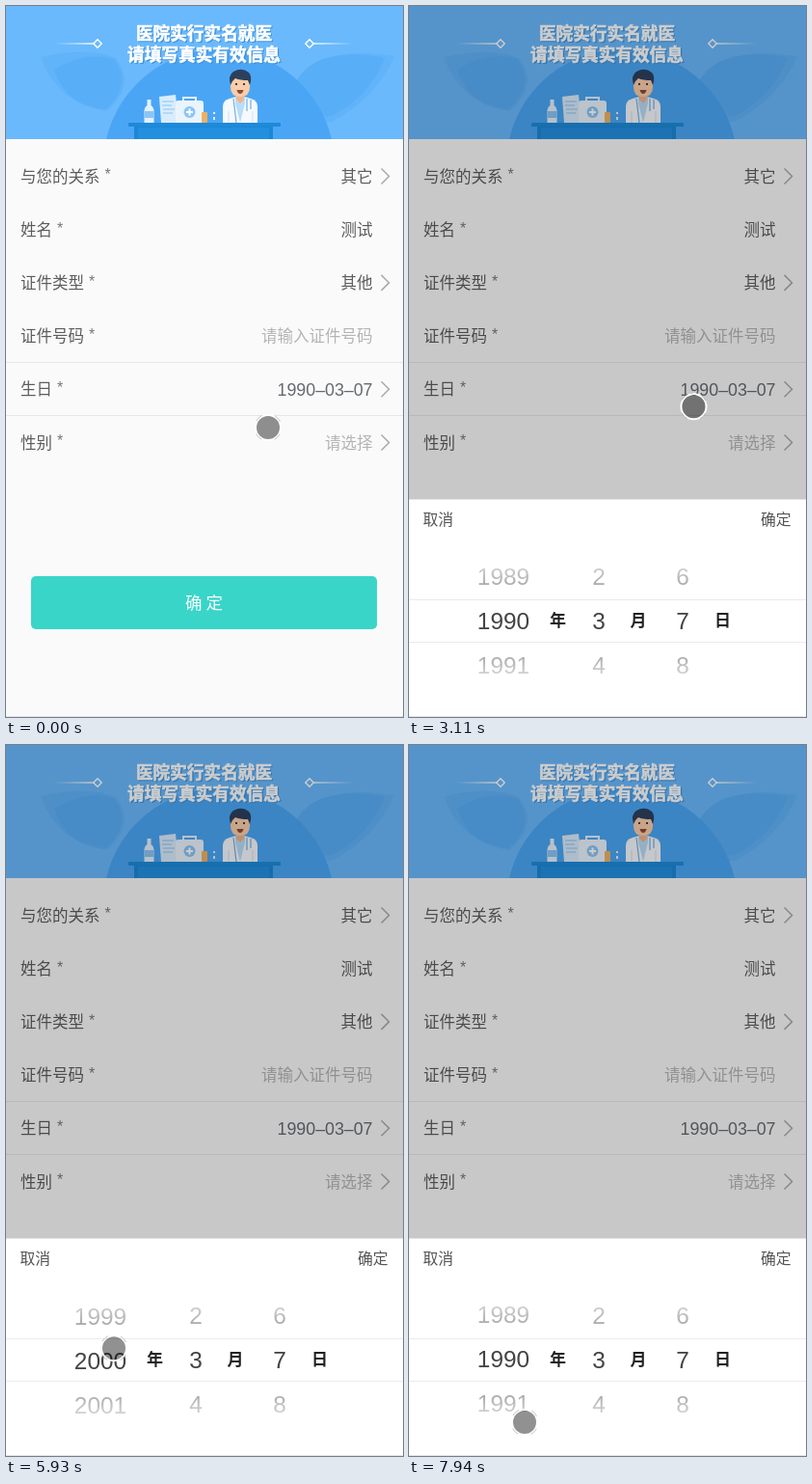
These frames come from a looping animation (412 by 737 pixels, 8 s). An HTML page:

```html
<!DOCTYPE html>
<html lang="zh-CN">
<head>
<meta charset="utf-8">
<title>实名信息</title>
<style>
html, body { margin: 0; width: 100%; height: 100%; overflow: hidden; background: #fafafa; }
svg { display: block; width: 100%; height: 100%; font-family: "Noto Sans CJK SC", "Noto Sans CJK", sans-serif; font-weight: 300; }
.num { font-family: "Liberation Sans", Arial, sans-serif; }
</style>
</head>
<body>
<svg viewBox="0 0 412 737">
  <defs>
    <linearGradient id="veil" x2="0" y2="1">
      <stop stop-color="#fff" stop-opacity=".88"/>
      <stop offset="1" stop-color="#fff" stop-opacity=".38"/>
    </linearGradient>
    <linearGradient id="ray">
      <stop stop-color="#fff" stop-opacity="0"/>
      <stop offset="1" stop-color="#fff"/>
    </linearGradient>
    <g id="deco">
      <rect x="50" y="38.300" width="41" height="1.400" fill="url(#ray)"/>
      <path d="M95 34.800l4.200 4.200-4.200 4.200-4.200-4.200z" fill="none" stroke="#fff" stroke-width="1.400"/>
    </g>
    <g id="mask">
      <rect y="535" width="412" height="36" fill="#fff"/>
      <rect y="571" width="412" height="44" fill="url(#veil)"/>
    </g>
    <clipPath id="bannerClip"><rect width="412" height="138"/></clipPath>
  </defs>

  <rect width="412" height="737" fill="#fafafa"/>
  <g clip-path="url(#bannerClip)">
    <rect width="412" height="138" fill="#6ab9fc"/>
    <path d="M36 53Q85 42 114 54Q136 82 104 109Q54 102 36 53z" fill="#61b3fa"/>
    <path d="M50 66Q82 46 112 55Q132 80 104 107Q62 104 50 66z" fill="#59aef8"/>
    <path d="M403 52Q352 44 322 58Q292 74 292 122L338 120Q384 96 403 52z" fill="#61b3fa"/>
    <path d="M393 54Q352 45 322 58Q292 74 292 116L338 114Q377 94 393 54z" fill="#59aef8"/>
    <circle cx="221" cy="165" r="120" fill="#4aa6f5"/>
    <use href="#deco"/>
    <use href="#deco" transform="matrix(-1 0 0 1 410 0)"/>
    <g id="title"></g>
    <!-- supplies -->
    <path d="M146.500 97h4v6q3 2 3 5v13h-10v-13q0-3 3-5z" fill="#e4f1fd"/>
    <path d="M144 109h9v7h-9z" fill="#8cc5f5"/>
    <path d="M159 94l17-2 3 29h-18z" fill="#d9ecfc"/>
    <path d="M162 99h12M162 103h10M163 107h12M163 111h10" stroke="#a5d1f6" stroke-width="1.300"/>
    <path d="M184 99v-4h13v4" fill="none" stroke="#e4f1fd" stroke-width="2"/>
    <rect x="176" y="98" width="29" height="23" rx="3" fill="#eaf4fd"/>
    <circle cx="190.500" cy="110" r="6" fill="#8cc5f5"/>
    <path d="M190.500 106.500v7M187 110h7" stroke="#fff" stroke-width="2"/>
    <rect x="203" y="110" width="6" height="11" rx="1" fill="#f0b060"/>
    <path d="M216 110v2M216 115v3" stroke="#e4f1fd" stroke-width="2"/>
    <!-- doctor -->
    <path d="M225 121v-17q0-6 7-8l7-2h8l7 2q7 2 7 8v17z" fill="#f6f9fd"/>
    <path d="M238 94h10v7l-5 20-5-20z" fill="#b9dcf8"/>
    <path d="M239 90h8v7l-4 4-4-4z" fill="#efb58d"/>
    <path d="M233 75h20v9q0 10-10 10t-10-10z" fill="#fbcda8"/>
    <path d="M233 82q-3-10 3-14 9-5 16 1 4 4 1 13l-2-5q-8 0-13-2l-3 3z" fill="#2c405e"/>
    <path d="M238 81h2M246 81h2" stroke="#2c405e" stroke-width="2"/>
    <path d="M239.500 87h7q-1 4-3.500 4t-3.500-4z" fill="#8a4a3c"/>
    <path d="M236 96l3 25M250 96v13M254 97v10" fill="none" stroke="#70aee3" stroke-width="1.200"/>
    <path d="M231 109v12M256 109v12" stroke="#cfdfee"/>
    <path d="M133 124h144v15H133z" fill="#1b87d7"/>
    <path d="M137 126h136v13H137z" fill="#2390df"/>
    <rect x="127" y="121" width="158" height="4" rx="1" fill="#1e8ad9"/>
  </g>

  <g id="form"></g>
  <rect x="26" y="591" width="359" height="55" rx="5" fill="#39d5c8"/>
  <g id="submit"></g>
  <rect id="shade" width="412" height="737" opacity=".2"/>

  <g id="sheet">
    <rect y="511.500" width="412" height="240" fill="#fff"/>
    <g id="wheels"></g>
    <use href="#mask"/>
    <use href="#mask" transform="matrix(1 0 0 -1 0 1274)"/>
    <path d="M0 615.500H412M0 659.500H412" stroke="#ebebeb"/>
    <g id="labels"></g>
  </g>

  <path d="M0 736.500H412" stroke="#e2e2e2"/>
  <g id="cursor" fill="none">
    <circle r="13" stroke="#fff" stroke-width="2"/>
    <circle r="14" stroke="#999" stroke-opacity=".6" stroke-dasharray="8 14" stroke-dashoffset="-7"/>
    <circle r="12" fill="#000" fill-opacity=".43"/>
  </g>
</svg>

<script>
const LOOP = 8000, STEP = 133, ROW = 46, MID = 637;
const $ = id => document.getElementById(id);
const clamp = v => Math.max(0, Math.min(1, v));
const mix = (a, b, p) => a + (b - a) * p;
const easeOut = p => 1 - (1 - p) ** 2;

// y is the optical middle of the line
const text = (str, x, y, size, fill, attrs = '') =>
  `<text x="${x}" y="${y + size * .37}" font-size="${size}" fill="${fill}" ${attrs}>${str}</text>`;
const END = 'text-anchor="end"', CENTER = 'text-anchor="middle"';

const heading = (str, y) => [[1.2, '#3f92dc'], [0, '#fff']].map(([d, fill]) =>
  text(str, 205.5 + d, y + d, 17.65, fill, `${CENTER} font-weight="700" stroke="${fill}" stroke-width=".6"`)).join('');
$('title').innerHTML = heading('医院实行实名就医', 28.5) + heading('请填写真实有效信息', 50);

const DARK = '#5c5c5c', HINT = '#b4b4b4';
$('form').innerHTML = [
  ['与您的关系', '其它', DARK, true],
  ['姓名', '测试', DARK, false],
  ['证件类型', '其他', DARK, true],
  ['证件号码', '请输入证件号码', HINT, false],
  ['生日', '1990–03–07', '#666a72', true],
  ['性别', '请选择', HINT, true],
].map(([label, value, fill, link], i) => {
  const y = 176.5 + i * 55.2, date = i === 4;
  return text(label, 15, y, 16.5, DARK)
    + text('*', 20 + label.length * 16.5, y - 2, 16, '#777', 'class="num"')
    + text(value, 380.5, y, date ? 17.8 : 16.5, fill, END + (date ? ' class="num"' : ''))
    + (link ? `<path d="M389.5 ${y - 8}l8 8-8 8" fill="none" stroke="#aaa" stroke-width="1.5"/>` : '');
}).join('') + '<path d="M0 369.5H412M0 424.5H412" stroke="#e6e6e6"/>';

$('submit').innerHTML = text('确 定', 205.5, 618.5, 17.5, '#fff', CENTER);
$('labels').innerHTML = text('取消', 14.5, 532, 15.8, '#555') + text('确定', 396.5, 532, 15.8, '#555', END)
  + [['年', 154.5], ['月', 238], ['日', 325.5]].map(([s, x]) =>
    text(s, x, MID, 17, '#222', CENTER + ' font-weight="700"')).join('');

// one picker column, turned to a possibly fractional value
const wheel = (value, x) => [-1, 0, 1, 2].map(d => {
  const n = Math.floor(value) + d;
  return text(n, x, MID + (n - value) * ROW, 24.4, '#444', CENTER + ' class="num"');
}).join('');
const fixed = wheel(3, 197) + wheel(7, 284);

// Each move ends at `to`. A swipe drags the year wheel as far as `via`,
// then lets it glide to `year` while the pointer goes on.
const DRAG = 5 / 8;
const moves = [
  { at: 130, end: 430, to: [305, 402] },
  { at: 960, end: 1630, to: [338, 399] },
  { at: 2680, end: 3660, wait: 3 / 8, via: [205, 450], to: [88, 659], opens: true },
  { at: 3810, end: 4750, via: [113, 550], to: [112, 650], year: 1994 },
  { at: 4870, end: 5810, via: [136, 523], to: [108, 643], year: 1999.59 },
  { at: 5930, end: 6830, via: [128, 554], to: [107, 573], year: 2002 },
  { at: 6980, end: 7940, via: [120, 722], to: [120, 702], year: 1990.03 },
];

// share of a move already done, in equal visible steps
function progress({ at, end }, t) {
  const gaps = Math.round((end - at) / STEP);
  return (Math.floor(clamp((t - at) / (end - at)) * gaps + 1e-6) + 1) / (gaps + 1);
}

function pose(t) {
  let pos = [272, 437], year = 1990, open = 0;
  for (const move of moves) {
    if (t < move.at) break;
    const p = progress(move, t), { via, to, wait = 0 } = move, from = pos;
    const q = clamp((p - wait) / (1 - wait));
    const along = (a, b, s) => a.map((v, i) => mix(v, b[i], s));
    pos = !via ? along(from, to, q)
      : q <= DRAG ? along(from, via, q / DRAG)
      : along(via, to, (q - DRAG) / (1 - DRAG));
    if (move.opens) open = easeOut(clamp((p - .11) / .3));
    if (move.year) {
      const dragged = year + (from[1] - (q <= DRAG ? pos : via)[1]) / ROW;
      year = mix(dragged, move.year, easeOut(clamp((q - DRAG) / (1 - DRAG))));
    }
  }
  return { pos, year, open };
}

function frame(now) {
  const { pos, year, open } = pose(now % LOOP);
  $('shade').style.display = $('sheet').style.display = open ? 'inline' : 'none';
  $('sheet').setAttribute('transform', `translate(0 ${226 * (1 - open)})`);
  $('cursor').setAttribute('transform', `translate(${pos})`);
  $('wheels').innerHTML = fixed + wheel(year, 98);
  requestAnimationFrame(frame);
}
requestAnimationFrame(frame);
</script>
</body>
</html>
```
